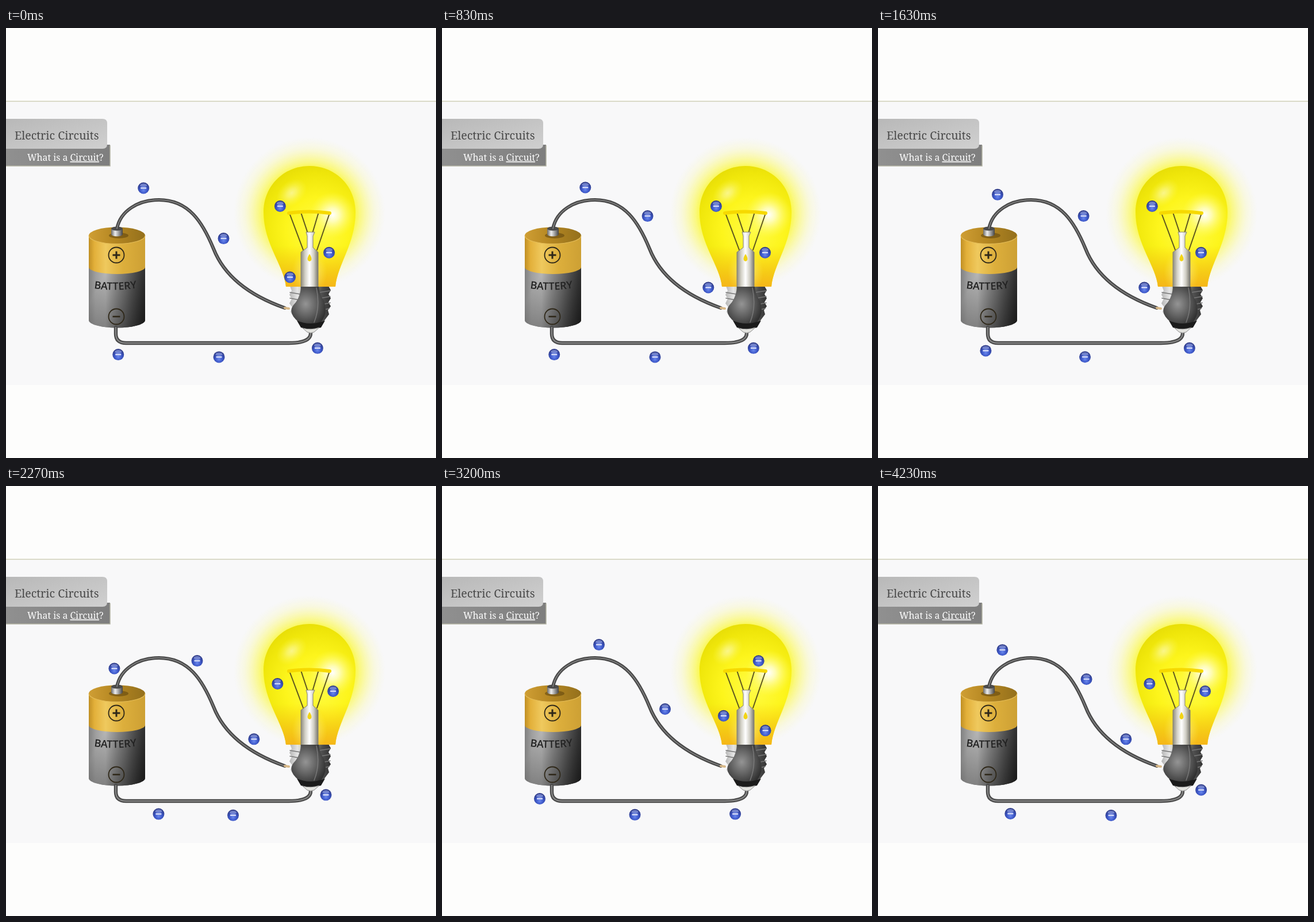
Recreate the animation shown at these times as an HTML page. Size 748 by 748 pixels, loop 4.26 s.

```html
<!DOCTYPE html>
<html lang="en">
<head>
<meta charset="utf-8">
<title>Electric circuit</title>
<style>
html, body { margin: 0; width: 100%; height: 100%; overflow: hidden; background: #fdfdfc; }
svg { display: block; width: 100vw; height: 100vh; }
.soft { filter: blur(.55px); }
.serif { font-family: "Noto Serif", serif; }
.label { font: 600 18px "Open Sans", sans-serif; }
.line { fill: none; stroke-linecap: round; stroke-linejoin: round; }
</style>
</head>
<body>
<svg viewBox="0 0 748 748">
  <defs>
    <linearGradient id="title" x2="1" y2="1">
      <stop stop-color="#b8b8b8"/><stop offset="1" stop-color="#d0d0d0"/>
    </linearGradient>
    <linearGradient id="subtitle">
      <stop stop-color="#909090"/><stop offset="1" stop-color="#7e7e7e"/>
    </linearGradient>
    <linearGradient id="gold">
      <stop stop-color="#c08f24"/><stop offset=".1" stop-color="#e3b03a"/><stop offset=".3" stop-color="#efc95e"/>
      <stop offset=".6" stop-color="#ddaf3c"/><stop offset="1" stop-color="#cda034"/>
    </linearGradient>
    <linearGradient id="lid">
      <stop stop-color="#cf9e34"/><stop offset=".45" stop-color="#b58722"/><stop offset="1" stop-color="#94701c"/>
    </linearGradient>
    <linearGradient id="steel">
      <stop stop-color="#808080"/><stop offset=".12" stop-color="#9e9e9e"/><stop offset=".3" stop-color="#b6b6b6"/>
      <stop offset=".65" stop-color="#8a8a8a"/><stop offset="1" stop-color="#4c4c4c"/>
    </linearGradient>
    <linearGradient id="shade" x1=".3" x2="1" y1=".4" y2="1">
      <stop stop-opacity="0"/><stop offset="1" stop-opacity=".7"/>
    </linearGradient>
    <linearGradient id="metal">
      <stop stop-color="#6a6a6a"/><stop offset=".35" stop-color="#eee"/><stop offset="1" stop-color="#444"/>
    </linearGradient>
    <linearGradient id="tube">
      <stop stop-color="#8d8a7c"/><stop offset=".25" stop-color="#d4d2c8"/><stop offset=".5" stop-color="#fff"/>
      <stop offset=".75" stop-color="#d0cec4"/><stop offset="1" stop-color="#77756c"/>
    </linearGradient>
    <linearGradient id="thread">
      <stop stop-color="#b5b5b5"/><stop offset=".2" stop-color="#e6e6e6"/><stop offset=".6" stop-color="#666"/><stop offset="1" stop-color="#333"/>
    </linearGradient>
    <radialGradient id="glass" gradientUnits="userSpaceOnUse" cx="542" cy="350" r="122">
      <stop stop-color="#fffb48"/><stop offset=".45" stop-color="#fdf51c"/>
      <stop offset=".8" stop-color="#efe60a"/><stop offset="1" stop-color="#e4da06"/>
    </radialGradient>
    <linearGradient id="amber" x2="0" y2="1">
      <stop offset=".66" stop-color="#f8bc18" stop-opacity="0"/><stop offset="1" stop-color="#f6b41a" stop-opacity=".95"/>
    </linearGradient>
    <radialGradient id="glow">
      <stop offset=".55" stop-color="#fbf71c"/><stop offset=".66" stop-color="#fbf83e" stop-opacity=".65"/>
      <stop offset=".85" stop-color="#fcfa80" stop-opacity=".22"/><stop offset="1" stop-color="#fcfab0" stop-opacity="0"/>
    </radialGradient>
    <radialGradient id="shine">
      <stop stop-color="#fff"/><stop offset=".3" stop-color="#fffed8" stop-opacity=".8"/><stop offset="1" stop-color="#fffc60" stop-opacity="0"/>
    </radialGradient>
    <radialGradient id="socket" cx=".42" cy=".45" r=".62">
      <stop stop-color="#949494"/><stop offset=".5" stop-color="#636363"/><stop offset="1" stop-color="#303030"/>
    </radialGradient>
    <radialGradient id="ball" cy=".68" r=".62">
      <stop stop-color="#6a88ee"/><stop offset=".5" stop-color="#3c57c8"/><stop offset="1" stop-color="#303c88"/>
    </radialGradient>
    <g id="electron">
      <circle r="10" fill="url(#ball)"/>
      <ellipse cy="-5" rx="6" ry="3" fill="#a3b1ea" opacity=".55"/>
      <rect x="-5" y="-1.4" width="10" height="2.6" fill="#d3daf8"/>
    </g>
    <path id="arc" d="M153 453Q192 459 236 451"/>
    <path id="upper" d="M193 349C199 318 230 299 266 299C318 299 342 338 361 384C379 430 420 464 485 487"/>
    <path id="lower" d="M191 521V532Q191 548 209 548H492Q530 548 530 531"/>
    <path id="bulb" d="M487 450C484 414 448 376 448 320C448 275 483 240 528 240C573 240 608 275 608 320C608 376 577 410 573 450Z"/>
    <path id="route" d="M170 544L194 568L229 570L405 573L509 571L541 558L562 530L568 457L562 422V386L570 353L565 320L545 298H509L477 309L472 343L494 413V447L460 452L428 439L388 388L375 358L357 326L310 284L274 276L241 278L210 287L174 338"/>
  </defs>

  <rect y="127" width="748" height="494" fill="#f8f8f9"/>
  <path d="M0 127.5H748" stroke="#cfcfb6" stroke-width="1.6"/>

  <g class="soft">
    <path d="M0 203H181V240H0Z" fill="url(#subtitle)"/>
    <path d="M0 240H181V204" fill="none" stroke="#b3b3a2" stroke-width="1.5"/>
    <path d="M0 158H168Q176 158 176 166V202Q176 210 168 210H0Z" fill="url(#title)"/>
    <text class="serif" x="15" y="194" font-size="19.5" fill="#484848">Electric Circuits</text>
    <text class="serif" x="37" y="231" font-size="15.8" fill="#fff">What is a <tspan text-decoration="underline">Circuit</tspan>?</text>

    <path id="can" d="M144 361V508A49 13.500 0 0 0 242 508V361Z" fill="url(#steel)"/>
    <use href="#can" style="fill:url(#shade)"/>
    <path d="M144 361V508A49 13.500 0 0 0 242 508V361Z" fill="url(#shade)"/>
    <path d="M144 361V416A49 12 0 0 0 242 416V361Z" fill="url(#gold)"/>
    <ellipse cx="193" cy="361" rx="49" ry="14.5" fill="url(#lid)"/>
    <path d="M144 361A49 14.5 0 0 0 242 361" fill="none" stroke="#e5bd58" stroke-width="1.2"/>
    <ellipse cx="196" cy="361" rx="17" ry="5" fill="#5d430d" opacity=".55"/>
    <path d="M183 349V359A10 3.5 0 0 0 203 359V349Z" fill="url(#metal)"/>
    <ellipse cx="193" cy="349" rx="10" ry="3.5" fill="#4b4b4b"/>
    <g fill="none" stroke="#2e2718" stroke-width="1.8">
      <circle cx="192" cy="395" r="13.5"/>
      <path d="M185.5 395H198.5M192 388.5V401.5" stroke-width="3"/>
      <circle cx="192" cy="502" r="13.5"/>
      <path d="M185.5 502H198.5" stroke-width="2.6"/>
    </g>
    <text class="label" fill="#222"><textPath href="#arc">BATTERY</textPath></text>

    <g class="line">
      <use href="#upper" stroke="#484848" stroke-width="6"/>
      <use href="#upper" stroke="#858585" stroke-width="1.6"/>
      <use href="#lower" stroke="#4a4a4a" stroke-width="6.4"/>
      <use href="#lower" stroke="#8a8a8a" stroke-width="2"/>
    </g>

    <circle cx="528" cy="322" r="132" fill="url(#glow)"/>
    <path d="M494 449H561L565 456L561 463L565 470L561 477L565 484L560 491L562 498L550 514H510L495 494L498 486L493 479L497 471L493 464L497 457Z" fill="url(#thread)"/>
    <path class="line" d="M494 460L512 463M494 470L510 473M545 460L564 457M547 470L564 467M549 481L564 478M549 491L562 488" stroke="#777" stroke-width="1.6"/>
    <use href="#bulb" fill="url(#glass)"/>
    <use href="#bulb" fill="url(#amber)"/>
    <ellipse cx="568" cy="325" rx="40" ry="40" fill="url(#shine)"/>
    <ellipse cx="497" cy="287" rx="30" ry="21" fill="url(#shine)" opacity=".5" transform="rotate(-40 497 287)"/>
    <ellipse cx="528" cy="425" rx="31" ry="42" fill="url(#shine)" opacity=".55"/>

    <path class="line" d="M493 322L517 386M563 322L541 386M513 321L525 357M544 320L533 357" stroke="#5e571e" stroke-width="2"/>
    <path class="line" d="M492 322Q528 317 563 322" stroke="#f6d900" stroke-width="6"/>
    <path d="M522 355H537L534 362V382L543 390V452H513V390L524 382V362Z" fill="url(#tube)" stroke="#85836f"/>
    <path d="M528 393Q535 404 528 406Q521 404 528 393Z" fill="#f2d414"/>

    <path d="M513 450H544Q546 466 553 474Q561 497 547 513Q529 521 511 513Q489 496 500 482Q512 470 513 450Z" fill="url(#socket)"/>
    <path class="line" d="M540 452Q547 485 536 512" stroke="#898989" stroke-width="1.5" opacity=".7"/>
    <path d="M506 509Q529 519 555 509L548 521Q530 527 513 521Z" fill="#1b1b1b"/>
    <path d="M516 522Q530 526 545 521L536 529Q530 532 524 529Z" fill="#e4e4e0" stroke="#8a8a8a"/>
    <path class="line" d="M485 487L492 488" stroke="#d8b888" stroke-width="4"/>
  </g>
  <g id="electrons" class="soft"></g>
</svg>
<script>
const LOOP = 4260, STEP = 1000 / 12;
const COUNT = 9, GAP = 5, LAP = 39;
const CYCLE = 44, FIRST = 21.7;

const route = document.getElementById("route");
const group = document.getElementById("electrons");
const electrons = Array.from({ length: COUNT }, () => {
  const ball = document.createElementNS("http://www.w3.org/2000/svg", "use");
  ball.setAttribute("href", "#electron");
  return group.appendChild(ball);
});

// Distance along the route; electrons slow down a little on the way.
const distance = steps => steps * (35.2 - steps * .018);

function draw(now) {
  const t = now % LOOP;
  // The cycle's last step repeats its first one.
  const step = Math.floor(t / STEP + FIRST) % (CYCLE + 1);
  electrons.forEach((ball, k) => {
    const late = k > 6 ? .3 : 0;
    const steps = (step - k * GAP + CYCLE) % CYCLE - late;
    const visible = steps >= 0 && steps < LAP;
    ball.style.display = visible ? "" : "none";
    if (!visible) return;
    const { x, y } = route.getPointAtLength(distance(steps));
    ball.setAttribute("transform", `translate(${x} ${y})`);
  });
}

let start;
function tick(now) {
  start ??= now;
  draw(now - start);
  requestAnimationFrame(tick);
}
draw(0);
requestAnimationFrame(tick);
</script>
</body>
</html>
```
